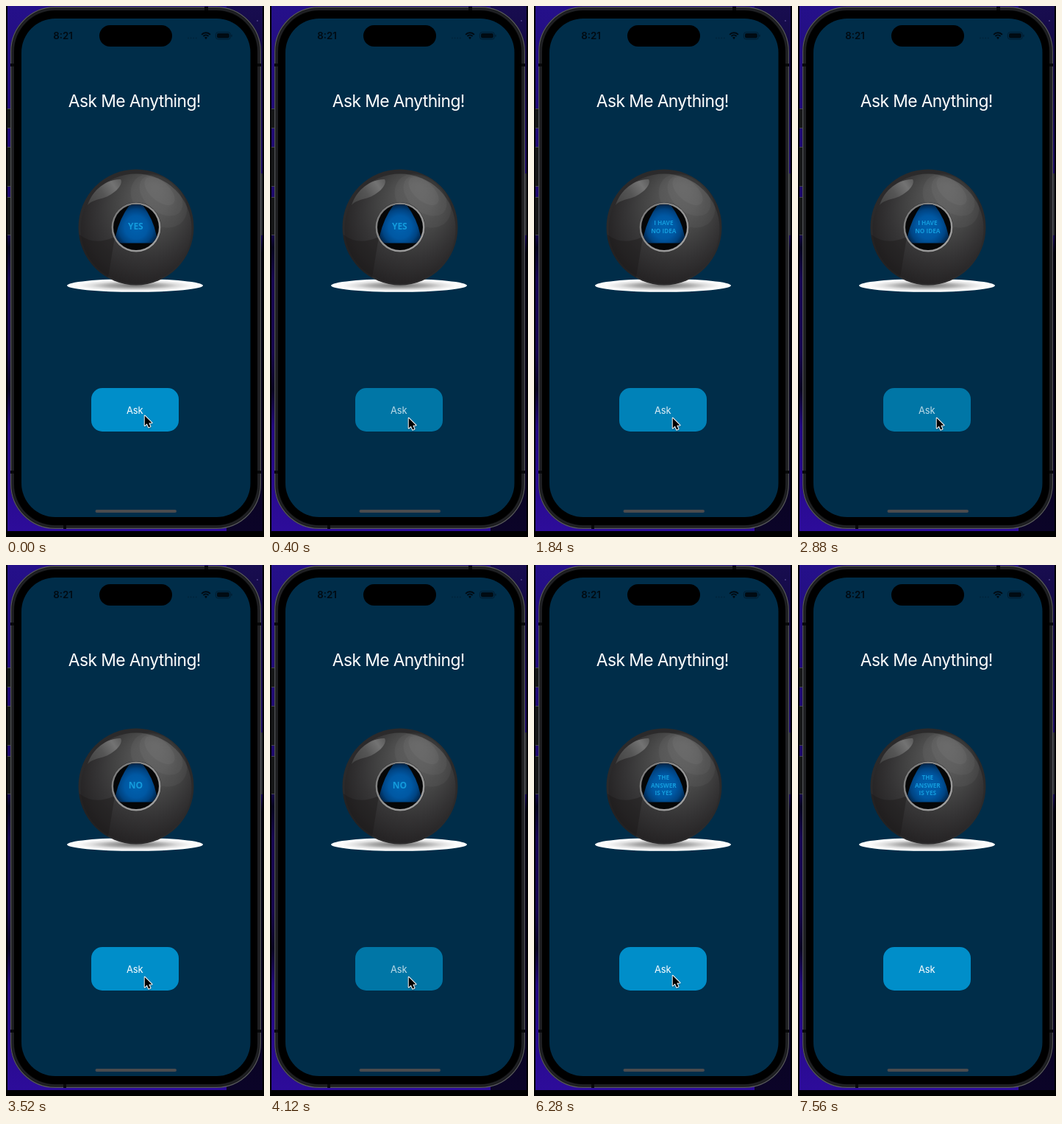
An HTML page with a canvas that plays this animation: 351x720 px, repeating every 7.6 s.

```html
<!DOCTYPE html>
<html lang="en">
<head>
<meta charset="utf-8">
<title>Ask Me Anything</title>
<style>
html, body { margin: 0; width: 351px; height: 720px; overflow: hidden; background: #000; }
canvas { display: block; }
</style>
</head>
<body>
<canvas id="stage" width="351" height="720"></canvas>
<script>
const LOOP = 7600;
const ctx = document.getElementById('stage').getContext('2d');

// Press times; the answer changes when the button is let go.
const PRESSES = [400, 1640, 2840, 4080];
const HOLD = 160, FADE = 80;
const LONG_YES = ['THE', 'ANSWER', 'IS YES'];
const ANSWERS = [['YES'], LONG_YES, ['I HAVE', 'NO IDEA'], ['NO'], LONG_YES];
const CURSOR_END = 7000;

const clamp = v => Math.max(0, Math.min(1, v));
const ease = v => { v = clamp(v); return v * v * (3 - 2 * v); };

function box(x, y, w, h, r, fill) {
  ctx.beginPath();
  ctx.roundRect(x, y, w, h, r);
  if (fill) { ctx.fillStyle = fill; ctx.fill(); }
}

function outline(x, y, w, h, r, color, width) {
  box(x, y, w, h, r);
  ctx.strokeStyle = color;
  ctx.lineWidth = width;
  ctx.stroke();
}

function oval(x, y, rx, ry, fill, turn = 0) {
  ctx.beginPath();
  ctx.ellipse(x, y, rx, ry, turn, 0, Math.PI * 2);
  ctx.fillStyle = fill;
  ctx.fill();
}

function shade(gradient, ...stops) {
  stops.forEach(([at, color]) => gradient.addColorStop(at, color));
  return gradient;
}

function label(text, x, y, font, color, spacing = 0) {
  ctx.font = font;
  ctx.letterSpacing = spacing + 'px';
  ctx.textAlign = 'center';
  ctx.fillStyle = color;
  ctx.fillText(text, x, y);
  ctx.letterSpacing = '0px';
}

function drawWallpaper() {
  ctx.fillStyle = '#000';
  ctx.fillRect(0, 0, 351, 720);
  ctx.fillStyle = shade(ctx.createLinearGradient(0, 0, 0, 712),
    [0, '#25108a'], [.2, '#210b78'], [.42, '#1c0768'], [.46, '#06031c'],
    [.52, '#170653'], [.66, '#16064e'], [.73, '#09031f'], [.8, '#220880'], [1, '#2d0c9a']);
  ctx.fillRect(2, 0, 346, 712);
  ctx.fillStyle = shade(ctx.createLinearGradient(0, 0, 0, 712),
    [0, '#180d50'], [.12, '#120840'], [.3, '#1c0a66'], [.44, '#140650'], [.47, '#03020c'], [1, '#0b0428']);
  ctx.fillRect(300, 0, 49, 712);
  oval(342, 20, .8, .8, '#7468b5');
}

function drawPhone() {
  [[139, 27], [191, 54], [259, 52]].forEach(([y, h]) => {
    box(1.5, y, 6, h, 1, '#161718');
    ctx.fillStyle = '#44464a';
    ctx.fillRect(2, y, 4, 1);
    ctx.fillRect(2, y + h - 1, 4, 1);
  });
  box(345, 227, 4, 84, 1, '#303236');

  box(6, 1, 341, 708, 61, '#18191b');
  outline(6.7, 1.7, 339.6, 706.6, 60, '#56575b', 1.2);
  outline(9.5, 4.5, 334, 701, 57, '#202124', 2.2);
  box(11, 6, 331, 698, 56, '#000');
  ctx.fillStyle = '#08090a';
  ctx.fillRect(6, 78, 5, 4);
  ctx.fillRect(342, 78, 5, 4);
  ctx.fillRect(6, 630, 5, 4);
  ctx.fillRect(342, 630, 5, 4);
  ctx.fillRect(270, 1, 5, 5);
  ctx.fillRect(78, 704, 4, 5);

  box(21, 17, 311.5, 676, 46, '#002d49');
  box(127, 26, 99, 29, 14.5, '#000');
  box(121.5, 683, 110.5, 4, 2, '#4a4b4e');
}

function drawStatus() {
  const ink = '#000b13';
  label('8:21', 77.5, 45, '600 13.3px Inter, sans-serif', ink);
  for (let i = 0; i < 4; i++) oval(248 + i * 3.6, 43.5, .9, .9, '#00243b');

  ctx.strokeStyle = ink;
  ctx.lineWidth = 1.9;
  [4.8, 8].forEach(r => {
    ctx.beginPath();
    ctx.arc(272, 44.3, r, -Math.PI * .76, -Math.PI * .24);
    ctx.stroke();
  });
  ctx.beginPath();
  ctx.moveTo(272, 45.3);
  ctx.arc(272, 44.3, 2.4, -Math.PI * .78, -Math.PI * .22);
  ctx.fillStyle = ink;
  ctx.fill();

  outline(285.4, 35.5, 20, 9.6, 3.2, '#001c2f', 1);
  box(287, 37, 16.8, 6.6, 2, ink);
  box(306.4, 38.8, 1.2, 3, .6, '#001c2f');
}

function drawBall() {
  ctx.save();
  ctx.translate(175.5, 379);
  ctx.scale(1, 8.8 / 92.5);
  oval(0, 0, 92.5, 92.5, shade(ctx.createRadialGradient(0, 0, 5, 0, 0, 92.5),
    [0, '#777'], [.35, '#aaa'], [.6, '#dedede'], [.82, '#fafafa'], [1, '#fff']));
  ctx.restore();

  oval(177, 300, 78.5, 78.5, '#2b2a2b');
  ctx.save();
  ctx.beginPath();
  ctx.arc(177, 300, 78.5, 0, Math.PI * 2);
  ctx.clip();
  oval(177, 302, 75.5, 74.5, shade(ctx.createRadialGradient(203, 247, 4, 185, 290, 88),
    [0, '#595959'], [.25, '#525252'], [.5, '#434343'], [.72, '#353435'], [1, '#252324']));

  // Stepped light on the right-hand side
  [[208, 264, 43, 31], [211, 257, 34, 22], [209, 251, 25, 13]].forEach(([x, y, rx, ry]) =>
    oval(x, y, rx, ry, 'rgba(255,255,255,.035)', .72));
  ctx.beginPath();
  ctx.moveTo(100, 310);
  ctx.quadraticCurveTo(120, 326, 148, 313);
  ctx.lineTo(138, 374);
  ctx.lineTo(96, 354);
  ctx.fillStyle = 'rgba(28,25,26,.45)';
  ctx.fill();

  ctx.beginPath();
  ctx.moveTo(111, 270);
  ctx.bezierCurveTo(118, 248, 139, 234, 156, 235);
  ctx.bezierCurveTo(161, 243, 144, 258, 130, 261);
  ctx.bezierCurveTo(122, 263, 115, 265, 111, 270);
  ctx.fillStyle = shade(ctx.createLinearGradient(112, 268, 155, 237),
    [0, '#434343'], [.45, '#555'], [.8, '#737373'], [1, '#606060']);
  ctx.fill();
  ctx.restore();

  oval(177, 300, 34, 34, '#303030');
  oval(177, 300, 33.5, 33.5, shade(ctx.createLinearGradient(150, 275, 204, 325),
    [0, '#777'], [.5, '#929292'], [1, '#a0a0a0']));
  oval(177, 300, 31, 31, '#050607');
}

function drawDie(lines) {
  ctx.save();
  ctx.beginPath();
  ctx.arc(177, 300, 31, 0, Math.PI * 2);
  ctx.clip();
  ctx.beginPath();
  ctx.moveTo(168, 270);
  ctx.quadraticCurveTo(177, 266, 186, 270);
  ctx.quadraticCurveTo(200, 288, 205, 312);
  ctx.quadraticCurveTo(206, 321, 197, 321.5);
  ctx.lineTo(157, 321.5);
  ctx.quadraticCurveTo(148, 321, 149, 312);
  ctx.quadraticCurveTo(155, 287, 168, 270);
  ctx.fillStyle = shade(ctx.createRadialGradient(177, 300, 3, 177, 300, 31),
    [0, '#0060ad'], [.45, '#0058a3'], [.75, '#004483'], [1, '#012447']);
  ctx.fill();
  ctx.restore();

  const single = lines.length === 1;
  const size = single ? 12 : 8.2;
  const step = 10.6;
  const first = single ? 303 : 302 - (lines.length - 1) * step / 2 + (lines.length === 3 ? -.3 : .2);
  lines.forEach((line, i) =>
    label(line, 176.3, first + i * step, `700 ${size}px "Open Sans", "Noto Sans", sans-serif`, '#139bdc'));
}

function drawButton(down) {
  const mix = (a, b) => Math.round(a + (b - a) * down);
  box(116, 518, 119, 59, 15, `rgb(0,${mix(142, 118)},${mix(201, 166)})`);
  label('Ask', 175.3, 552.5, '400 12.9px Inter, sans-serif', `rgba(255,255,255,${1 - .25 * down})`);
}

function drawCursor(x, y) {
  ctx.save();
  ctx.translate(x, y);
  ctx.beginPath();
  [[0, 0], [0, 13.6], [3.1, 10.8], [5.4, 15.8], [7.8, 14.7], [5.6, 9.9], [9.8, 9.7]]
    .forEach(([px, py]) => ctx.lineTo(px, py));
  ctx.closePath();
  ctx.shadowColor = 'rgba(0,0,0,.35)';
  ctx.shadowBlur = 2;
  ctx.shadowOffsetY = 1;
  ctx.lineJoin = 'round';
  ctx.lineWidth = 2;
  ctx.strokeStyle = '#fff';
  ctx.stroke();
  ctx.shadowColor = 'transparent';
  ctx.fillStyle = '#000';
  ctx.fill();
  ctx.restore();
}

function pressAt(t) {
  return Math.max(...PRESSES.map(p =>
    t < p ? 0 : t < p + HOLD ? 1 : 1 - clamp((t - p - HOLD) / FADE)));
}

function draw(t) {
  drawWallpaper();
  drawPhone();
  drawStatus();
  label('Ask Me Anything!', 174.8, 137, '400 22.8px Inter, sans-serif', '#fff', -.6);
  drawBall();
  drawDie(ANSWERS[PRESSES.filter(p => t >= p + HOLD).length]);
  drawButton(pressAt(t));
  if (t < CURSOR_END) {
    const y = 555.5 + 3.3 * ease(t / 360) - 2 * ease((t - 5600) / 500);
    drawCursor(188.7, y);
  }
}

const start = performance.now();
function tick() {
  draw((performance.now() - start) % LOOP);
  requestAnimationFrame(tick);
}
tick();
</script>
</body>
</html>
```
